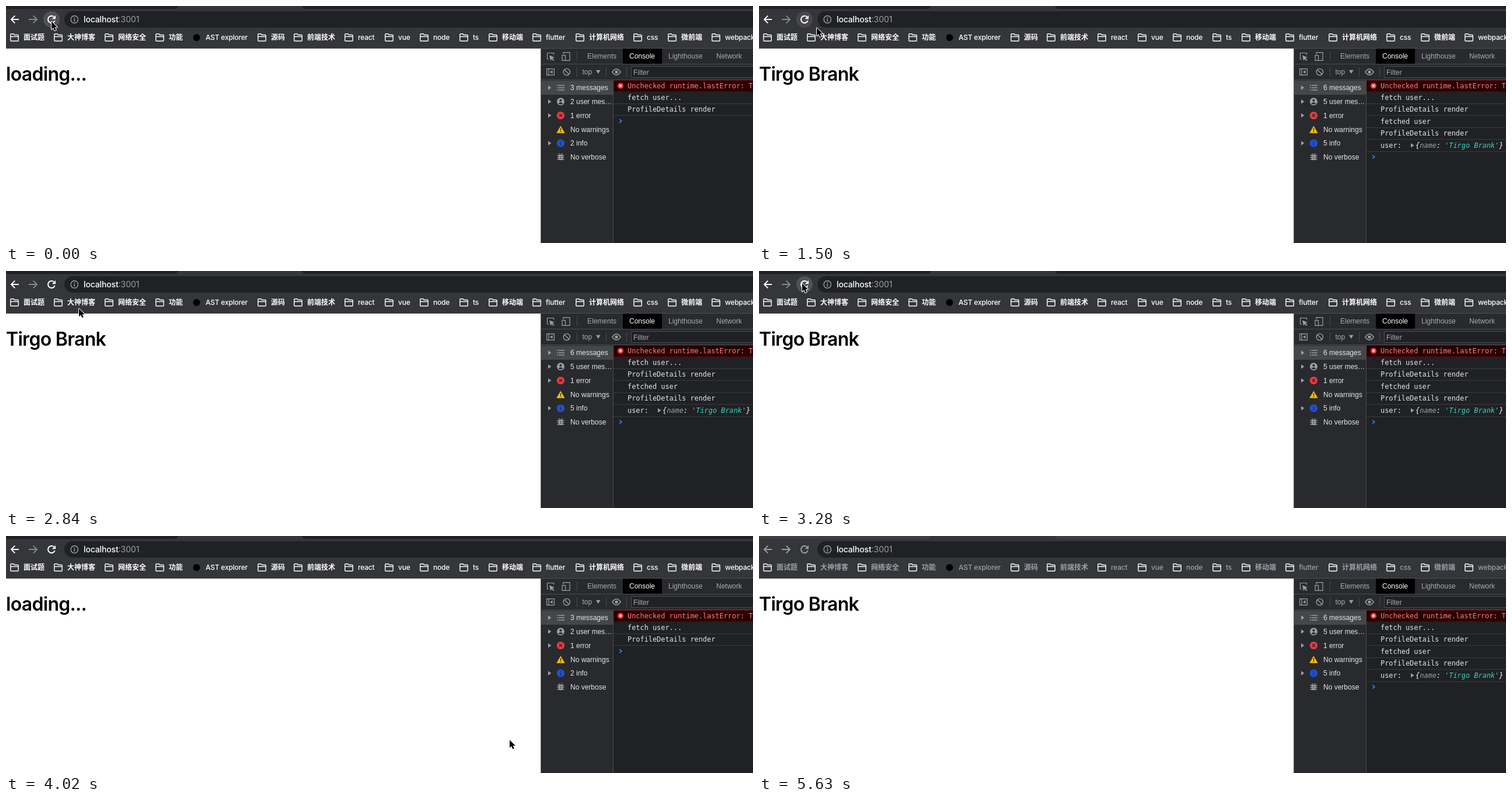
These frames come from a looping animation (1280x406 px, 5650 ms). An HTML page with a canvas:

```html
<!DOCTYPE html>
<html lang="en">
<head>
<meta charset="utf-8">
<title>Console reload</title>
<style>
html, body { margin: 0; width: 100%; height: 100%; overflow: hidden; background: #fff; }
canvas { display: block; }
</style>
</head>
<body>
<canvas id="stage" width="1280" height="406"></canvas>
<script>
const ctx = document.getElementById('stage').getContext('2d');
const LOOP = 5650;
const USER = 'Tirgo Brank';
const UI = '12px "Liberation Sans", Arial, sans-serif';
const LATIN = '500 12px Inter, sans-serif';
const HAN = '600 12px "Noto Sans CJK SC", "Noto Sans CJK", sans-serif';
const MONO = '11.9px "DejaVu Sans Mono", Menlo, monospace';
const GREY = '#9aa0a6', LINE = '#494c50', PANEL = '#292a2d', DARK = '#202124', BAR = '#35363a';
const PALE = '#e3e6ea';

const BOOKMARKS = [
  [7, '面试题'], [82, '大神博客'], [169, '网络安全'], [256, '功能'], [319, 'AST explorer'],
  [431, '源码'], [493, '前端技术'], [580, 'react'], [649, 'vue'], [709, 'node'], [777, 'ts'],
  [827, '移动端'], [902, 'flutter'], [976, '计算机网络'], [1075, 'css'], [1134, '微前端'], [1209, 'webpack']
];

// [start, errors, log lines, heading]
const PHASES = [
  [0, 1, 2, 'loading...'], [750, 1, 5, USER], [3430, 0, 0, USER], [3580, 1, 0, ''],
  [3730, 1, 1, 'loading...'], [3870, 1, 2, 'loading...'], [4750, 1, 5, USER]
];

// [start, x, y]; no position means the pointer is off stage
const POINTER = [
  [0, 77, 25], [1500, 98, 36], [1650, 489, 218], [1790], [2240, 1075, 380], [2390, 704, 311],
  [2540, 384, 180], [2690, 197, 90], [2840, 124, 63], [2990, 98, 33], [3130, 73, 20],
  [3870, 844, 343], [4020, 862, 348], [4160, 1050, 403], [4310]
];

// [start, strength] of the reload button highlight
const HOVER = [[0, 1], [1500, 0.66], [1650, 0.33], [1790, 0], [3280, 1], [3870, 0]];

const LOGS = ['fetch user...', 'ProfileDetails render', 'fetched user', 'ProfileDetails render'];

const at = (steps, t) => steps.filter(s => s[0] <= t).pop();

function rect(x, y, w, h, color) {
  ctx.fillStyle = color;
  ctx.fillRect(x, y, w, h);
}

function text(str, x, y, font, color, spacing = 0) {
  ctx.font = font;
  ctx.letterSpacing = spacing + 'px';
  ctx.fillStyle = color;
  ctx.fillText(str, x, y);
  return x + ctx.measureText(str).width;
}

function disc(x, y, r, color) {
  ctx.beginPath();
  ctx.arc(x, y, r, 0, 7);
  ctx.fillStyle = color;
  ctx.fill();
}

function ring(x, y, r, color, width = 1.3) {
  ctx.beginPath();
  ctx.arc(x, y, r, 0, 7);
  ctx.lineWidth = width;
  ctx.strokeStyle = color;
  ctx.stroke();
}

function stroke(d, color, width = 1.3) {
  ctx.strokeStyle = color;
  ctx.lineWidth = width;
  ctx.stroke(new Path2D(d));
}

function fill(d, color) {
  ctx.fillStyle = color;
  ctx.fill(new Path2D(d));
}

function cross(x, y, r, color, width) {
  stroke(`M${x - r} ${y - r}L${x + r} ${y + r}M${x + r} ${y - r}L${x - r} ${y + r}`, color, width);
}

function infoMark(x, y, color) {
  rect(x - 0.8, y - 3.4, 1.6, 1.7, color);
  rect(x - 0.8, y - 0.7, 1.6, 4.2, color);
}

function clip(str, max) {
  ctx.font = UI;
  ctx.letterSpacing = '0px';
  if (ctx.measureText(str).width <= max) return str;
  while (ctx.measureText(str + '…').width > max) str = str.slice(0, -1);
  return str + '…';
}

function folder(x) {
  stroke(`M${x + 0.8} 59V49q0-1.3 1.3-1.3h3.8l1.7 1.8h5.3q1.3 0 1.3 1.3V59q0 1-1 1H${x + 1.8}q-1 0-1-1z`, '#fff', 1.4);
  rect(x + 1, 51.7, 13, 1.4, '#fff');
}

function reload(color) {
  ctx.beginPath();
  ctx.arc(78, 23, 6, 0.38, -0.85);
  ctx.lineWidth = 2;
  ctx.strokeStyle = color;
  ctx.stroke();
  fill('M85 16V22.2H78.8z', color);
}

function drawBrowser(t) {
  const idle = t >= 5630;
  const bright = idle ? GREY : '#fff';
  rect(0, 0, 1280, 73, BAR);
  const strip = idle ? '#3c4043' : DARK;
  fill('M0 0H295Q293 5 288 5H0z', strip);
  fill('M507 0H1280V5H514Q509 5 507 0z', strip);

  stroke('M22 23H9.5M15.3 16.7L9 23L15.3 29.3', bright, 1.9);
  stroke('M39 23H51.5M46.7 16.7L53 23L46.7 29.3', idle ? GREY : '#87898d', 1.9);
  const hover = at(HOVER, t)[1];
  if (hover) disc(78, 23, 14, `rgba(255,255,255,${0.14 * hover})`);
  if (t >= 3730 && t < 3870) cross(78, 23, 5.5, bright, 2);
  else reload(bright);

  ctx.beginPath();
  ctx.roundRect(100, 9, 1220, 28, 14);
  ctx.fillStyle = DARK;
  ctx.fill();
  ring(117.3, 23, 6.2, GREY, 1.4);
  infoMark(117.3, 23, GREY);
  const end = text('localhost', 133, 28, '500 14px Inter, sans-serif', '#fff', -0.15);
  text(':3001', end, 28, '14px Inter, sans-serif', GREY);

  for (const [x, label] of BOOKMARKS) {
    const latin = /[a-z]/.test(label);
    if (label === 'AST explorer') disc(x + 7.5, 54, 6, '#000');
    else folder(x);
    text(label, x + 23, 58, latin ? LATIN : HAN, bright, latin ? -0.2 : 0);
  }
  rect(0, 72, 1280, 1, '#4b4c4f');
}

function drawToolbars() {
  rect(916, 73, 364, 333, PANEL);
  rect(916, 73, 1, 333, '#606164');
  rect(1057, 73, 67, 26, '#000');
  rect(917, 99, 363, 1, LINE);
  rect(917, 126, 363, 1, LINE);
  [['Elements', 996], ['Console', 1068], ['Lighthouse', 1135], ['Network', 1217]].forEach(([name, x]) =>
    text(name, x, 90, UI, name === 'Console' ? '#fff' : '#a6abb1'));
  rect(978, 78, 1, 16, LINE);

  stroke('M930 91H927.5V80.5H938.5V83.5', GREY, 1.2);
  fill('M931 84.5L940 88L936.5 89.3L939.5 92.7L938 94L935 90.7L933.2 94z', GREY);
  stroke('M955 83V79.6H966V93.4H959M953 84.6H958.5V93.4H953z', GREY, 1.2);

  stroke('M926.6 107.6H939.4V118.4H926.6zM930 107.6V118.4', GREY, 1.2);
  fill('M936.5 110V116L932 113z', GREY);
  ring(960.8, 113, 5.6, GREY, 1.4);
  stroke('M957 109.2L964.6 116.8', GREY, 1.4);
  rect(978, 105, 1, 16, LINE);
  text('top', 987.5, 117, UI, '#a6abb1');
  fill('M1011 109.8H1018.5L1014.7 116z', GREY);
  rect(1028, 105, 1, 16, LINE);
  stroke('M1038.8 113Q1046 103 1053.2 113Q1046 123 1038.8 113z', GREY, 1.4);
  disc(1046, 113, 2.6, GREY);
  rect(1063, 105, 1, 16, LINE);
  rect(1071, 103, 209, 20, LINE);
  rect(1072, 104, 208, 18, DARK);
  text('Filter', 1075, 118, UI, '#a6abb1');
}

const ICONS = [
  y => [-4, 0, 4].forEach(d => {
    rect(944, y + d - 0.7, 2, 1.4, GREY);
    rect(947, y + d - 0.7, 10, 1.4, GREY);
  }),
  y => {
    disc(950.4, y, 6.5, GREY);
    disc(950.4, y - 2, 2.1, PANEL);
    fill(`M946.4 ${y + 3.2}Q950.4 ${y - 0.8} 954.4 ${y + 3.2}Q950.4 ${y + 6.2} 946.4 ${y + 3.2}z`, PANEL);
  },
  y => {
    disc(950.4, y, 6.6, '#eb3941');
    cross(950.4, y, 2.5, PANEL, 1.4);
  },
  y => {
    fill(`M950.4 ${y - 6}L957.6 ${y + 6.5}H943.2z`, '#f5bd00');
    rect(949.7, y - 2, 1.5, 4.2, PANEL);
    rect(949.7, y + 3.2, 1.5, 1.5, PANEL);
  },
  y => {
    disc(950.4, y, 6.6, '#2151d1');
    infoMark(950.4, y, PANEL);
  },
  y => {
    fill(`M947 ${y - 2}Q950.4 ${y - 7} 953.8 ${y - 2}V${y + 3}Q950.4 ${y + 8} 947 ${y + 3}z`, GREY);
    stroke(`M944.5 ${y - 3}H956.3M944.5 ${y + 0.5}H956.3M944.5 ${y + 4}H956.3M947.5 ${y - 6.2}L949 ${y - 4.5}M953.3 ${y - 6.2}L951.8 ${y - 4.5}`, GREY, 1.3);
    stroke(`M949 ${y - 0.7}H951.8M949 ${y + 2}H951.8`, PANEL, 1.1);
  }
];

function drawSidebar(errors, logs) {
  rect(917, 128, 123, 24, '#454648');
  const items = [
    [errors + logs, 'message', 's'], [logs, 'user message', 's'], [errors, 'error', 's'],
    [0, 'warning', 's'], [logs, 'info', ''], [0, 'verbose', '']
  ];
  items.forEach(([n, noun, plural], i) => {
    const y = 140 + i * 23.75;
    if (n) fill(`M929 ${y - 3.7}L934.3 ${y}L929 ${y + 3.7}z`, GREY);
    ICONS[i](y);
    const label = `${n || 'No'} ${noun}${n === 1 ? '' : plural}`;
    text(clip(label, 75), 967, Math.round(y + 4.3), UI, PALE);
  });
}

function drawUserRow(y) {
  text('user:', 1065, y, MONO, PALE);
  fill(`M1117 ${y - 8}L1122.5 ${y - 4.3}L1117 ${y - 0.6}z`, GREY);
  const italic = 'italic ' + MONO;
  let x = 1125;
  for (const [str, color] of [
    ['{', '#fff'], ['name', GREY], [': ', '#fff'], [`'${USER}'`, '#35d4c7'], ['}', '#fff']
  ]) x = text(str, x, y, italic, color);
}

function drawConsole(errors, logs) {
  rect(1040, 127, 240, 279, DARK);
  rect(1040, 127, 1, 279, LINE);
  if (errors) {
    rect(1041, 127, 239, 20, '#5c0000');
    rect(1041, 128, 239, 18, '#290000');
    disc(1053, 136.7, 5, '#eb3941');
    cross(1053, 136.7, 1.9, '#fff', 1.3);
    text('Unchecked runtime.lastError: The message', 1065, 141, MONO, '#ff8080');
  }
  for (let i = 0; i < logs; i++) {
    const y = 161 + i * 20.4;
    if (i < LOGS.length) text(LOGS[i], 1065, Math.round(y), MONO, PALE);
    else drawUserRow(243);
    rect(1041, Math.round(y + 6), 239, 1, '#3a3b3e');
  }
  const y = 136 + (errors + logs) * 20.4;
  stroke(`M1051 ${y - 3}L1055 ${y}L1051 ${y + 3}`, '#3b82f0', 1.5);
}

function drawPointer(x, y) {
  ctx.save();
  ctx.translate(x, y);
  const arrow = 'M1 1.6V15L4.1 12.1L6.3 17L8.8 15.9L6.6 11.2H10.8z';
  ctx.lineJoin = 'round';
  stroke(arrow, '#fff', 2);
  fill(arrow, '#000');
  ctx.restore();
}

function draw(t) {
  const [, errors, logs, heading] = at(PHASES, t);
  rect(0, 0, 1280, 406, '#fff');
  drawBrowser(t);
  text(heading, 0, 128, '600 32px Inter, sans-serif', '#000', -0.7);
  drawToolbars();
  drawSidebar(errors, logs);
  drawConsole(errors, logs);
  const [, x, y] = at(POINTER, t);
  if (x !== undefined) drawPointer(x, y);
}

const start = performance.now();
function tick() {
  draw((performance.now() - start) % LOOP);
  requestAnimationFrame(tick);
}
tick();
</script>
</body>
</html>
```
